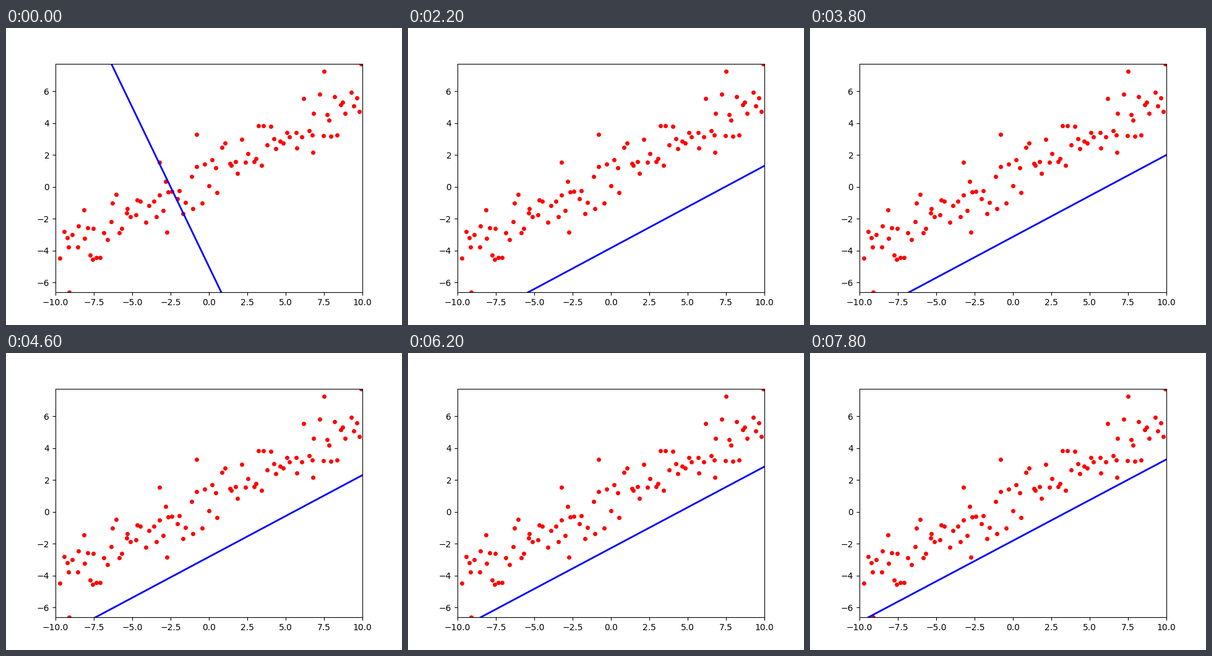
A matplotlib script for the animation above (8 s loop, 640 by 480 pixels).

```python
import matplotlib.pyplot as plt
import numpy as np
from matplotlib.animation import FuncAnimation

FRAMES = 40
RATE = 0.01
SLOPE, ICEPT = 0.503, 0.857      # least squares fit of the cloud
MEAN_X, MEAN_XX = 0.089, 35.475  # moments of the sample positions

# The points that stand out; the rest scatter around the fit.
OUTLIERS = [(-9.11, -6.61), (-8.15, -1.44), (-7.58, -4.54), (-6.29, -1.01),
            (-3.23, 1.55), (-2.74, -2.84), (-0.81, 3.29), (3.23, 3.84),
            (6.77, 2.17), (7.50, 7.25), (8.35, 3.26), (9.92, 7.73)]


def make_cloud(count, seed):
    rng = np.random.default_rng(seed)
    x = np.linspace(-9.76, 9.84, count) + rng.uniform(-0.12, 0.12, count)
    noise = np.clip(rng.normal(0, 0.95, count), -1.7, 1.7)
    cloud = np.column_stack([x, SLOPE * x + ICEPT + noise])
    return np.vstack([cloud, OUTLIERS]).T


def descend(slope, icept, steps):
    """Gradient descent on the mean squared error, one fit per step."""
    fits = []
    for _ in range(steps):
        fits.append((slope, icept))
        ds, di = slope - SLOPE, icept - ICEPT
        slope -= 2 * RATE * (ds * MEAN_XX + di * MEAN_X)
        icept -= 2 * RATE * (ds * MEAN_X + di)
    return fits


fits = descend(-2.0, -5.0, FRAMES)
ends = np.array([-10.0, 10.0])

fig, ax = plt.subplots(figsize=(6.4, 4.8), dpi=100)
ax.set_xlim(*ends)
ax.set_ylim(-6.61, 7.73)
ax.plot(*make_cloud(88, 7), "ro", markersize=4)
line, = ax.plot([], [], "b", linewidth=2)


def update(i):
    slope, icept = fits[i]
    line.set_data(ends, slope * ends + icept)
    return line,


anim = FuncAnimation(fig, update, frames=FRAMES, interval=200,
                     init_func=lambda: update(0), repeat=True, repeat_delay=0)
plt.show()
```
